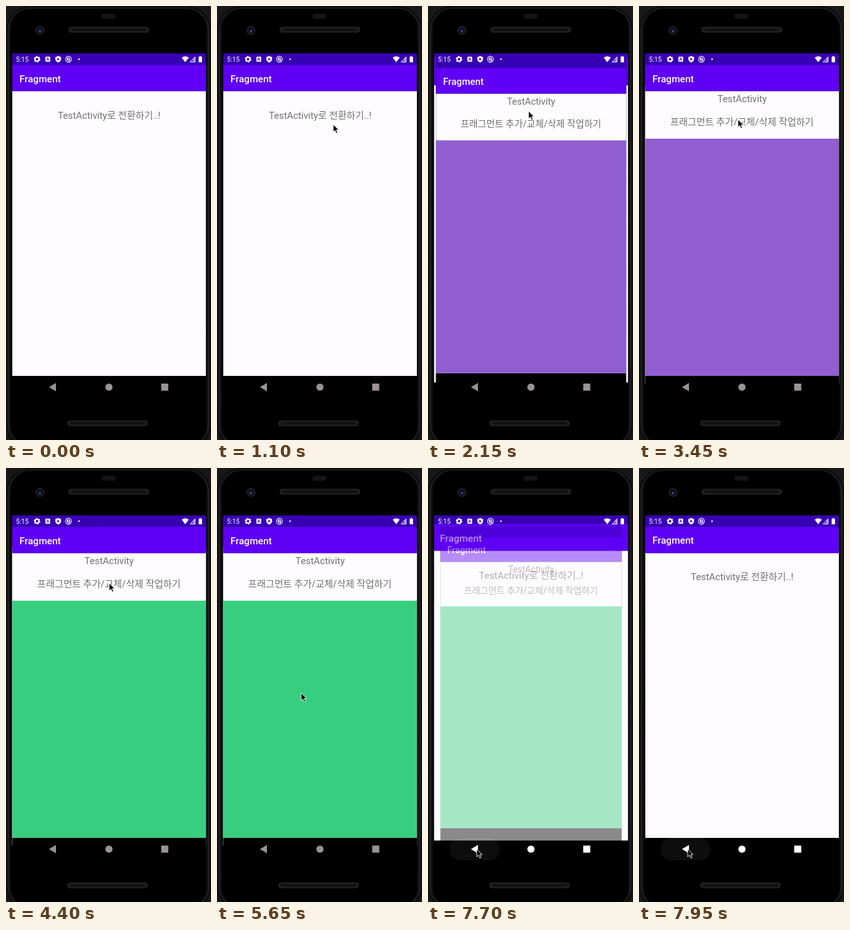
These frames come from a looping animation (320x677 px, 8 s). An HTML page:

```html
<!DOCTYPE html>
<html lang="ko">
<head>
<meta charset="utf-8">
<style>
html, body { margin: 0; width: 100%; height: 100%; overflow: hidden; background: #0a0a0a; }
svg { display: block; width: 100%; height: 100%; }
text { font-family: Roboto, "Noto Sans CJK KR", "Noto Sans CJK", sans-serif; }
.label { font-size: 14.8px; fill: #707070; text-anchor: middle; }
.title { font-size: 15.1px; font-weight: 500; fill: #fff; }
</style>
</head>
<body>
<svg viewBox="0 0 320 677">
  <defs>
    <clipPath id="screen"><rect x="9.5" y="74" width="302.7" height="539"/></clipPath>
    <linearGradient id="rim">
      <stop offset="0" stop-color="#1b1a1b"/><stop offset=".02" stop-color="#0b0b0b"/>
      <stop offset=".98" stop-color="#0b0b0b"/><stop offset="1" stop-color="#1b1a1b"/>
    </linearGradient>
    <g id="bars">
      <rect x="9.5" y="74" width="302.7" height="539"/>
      <rect x="9.5" y="74" width="302.7" height="19" fill="#3800b3"/>
      <rect x="9.5" y="92" width="302.7" height="41" fill="#5f00f4"/>
      <rect x="9.5" y="133" width="302.7" height="444" fill="#fefcfe"/>
      <text class="title" x="21" y="118.5">Fragment</text>
    </g>
    <g id="grille">
      <rect width="125" height="8" rx="4" fill="#1d1b1c" stroke="#302d2e" stroke-width=".8"/>
      <path d="M5 4H120" stroke="#090909" stroke-width="3" stroke-dasharray="1.2 .8"/>
    </g>
  </defs>

  <rect width="320" height="677" fill="#191819"/>
  <rect x="1" y="1" width="318" height="690" rx="36" fill="url(#rim)" stroke="#080808"/>
  <rect x="4" y="3" width="312" height="684" rx="34" fill="none" stroke="#29282a" stroke-width="1.2"/>
  <rect x="8" y="5" width="305" height="680" rx="31" fill="#000"/>
  <rect x="149" y="12" width="22" height="8" rx="4" fill="#151415"/>
  <circle cx="53" cy="38" r="6.5" fill="#171719" stroke="#252528"/>
  <circle cx="53" cy="38" r="3.4" fill="#0a0a28"/>
  <circle cx="53" cy="39" r="1.5" fill="#5560b8"/>
  <use href="#grille" x="98" y="33"/>
  <use href="#grille" x="96" y="647"/>

  <g clip-path="url(#screen)">
    <g id="main">
      <use href="#bars"/>
      <text class="label" x="161" y="175.5">TestActivity로 전환하기..!</text>
    </g>
    <g id="test">
      <use href="#bars"/>
      <rect id="fragment" x="9.5" y="207" width="302.7" height="370"/>
      <text class="label" x="161" y="150.3">TestActivity</text>
      <text class="label" x="160.7" y="186.2">프래그먼트 추가/교체/삭제 작업하기</text>
    </g>
  </g>

  <g fill="#fff">
    <text x="15.5" y="87" font-size="10.3">5:15</text>
    <circle cx="48.5" cy="83" r="3" fill="none" stroke="#fff" stroke-width="2.2"/>
    <circle cx="48.5" cy="83" r="4.4" fill="none" stroke="#fff" stroke-width="1.4" stroke-dasharray="2.3 2.3"/>
    <rect x="61.5" y="79" width="7.5" height="8" rx="1"/>
    <path d="M63.3 85.5 65.2 80.5 67.2 85.5M64 84H66.5" fill="none" stroke="#3800b3" stroke-width=".9"/>
    <path d="M81.5 78 86 79.8V83Q85.5 86.5 81.5 88.3 77.5 86.5 77 83V79.8Z"/>
    <path d="M80.2 80.8V85.2L83.8 83Z" fill="#3800b3"/>
    <g fill="none" stroke="#fff" stroke-width="1.1">
      <circle cx="97.5" cy="83" r="4.6"/><circle cx="97.5" cy="82.8" r="2.1"/><path d="M95 80.5 100.5 86.5"/>
    </g>
    <circle cx="114" cy="83" r="1.3"/>
    <path d="M274.3 80.5Q279.8 76.7 285.3 80.5L279.8 87.8Z"/>
    <path d="M287.5 87.3H295V79.5Z" fill="none" stroke="#fff"/>
    <path d="M291.5 87.5V83L295.3 79V87.5Z" opacity=".45"/>
    <path d="M302 78.3H304.5V79.3H306V87.7H300.7V79.3H302Z"/>
  </g>

  <rect id="ripple" x="34" y="577" width="77.5" height="35" rx="16" fill="#fff"/>
  <g id="nav">
    <path d="M67 594.5 78 588V601Z"/>
    <circle cx="160.7" cy="594.5" r="5.6"/>
    <rect x="242.3" y="589" width="11" height="11" rx=".6"/>
  </g>
  <path id="cursor" d="M0 0V12L2.8 9.4 4.8 14 6.9 13.1 4.9 8.6H8.6Z" fill="#000" stroke="#fff" stroke-width=".9"/>
</svg>
<script>
const LOOP = 8000, OPEN = 2015, SWAP = 3900, PRESS = 7530, CLOSE = 7620, SPAN = 400;
const $ = id => document.getElementById(id);
const clamp = v => Math.min(1, Math.max(0, v));
const bez = (a, b, c, d, u) =>
  a * (1 - u) ** 3 + 3 * b * u * (1 - u) ** 2 + 3 * c * u * u * (1 - u) + d * u ** 3;

// fast out, extra slow in: two joined cubic curves
function ease(x) {
  x = clamp(x);
  const [xs, ys] = x < 1 / 6
    ? [[0, .05, .133333, 1 / 6], [0, 0, .06, .4]]
    : [[1 / 6, .208333, .25, 1], [.4, .82, 1, 1]];
  let lo = 0, hi = 1;
  for (let i = 0; i < 24; i++) {
    const mid = (lo + hi) / 2;
    if (bez(...xs, mid) < x) lo = mid; else hi = mid;
  }
  return bez(...ys, lo);
}

// time, x, y
const track = [
  [350, 321, 274], [900, 190, 192], [1500, 157, 164], [2700, 157, 164],
  [3250, 154.5, 177], [3500, 154.5, 177], [4150, 161, 179.5], [5250, 161, 179.5],
  [6000, 107, 490], [6450, 84, 612], [6700, 85, 607], [6900, 81, 600],
  [7250, 76, 594.5], [8000, 76, 594.5]
];

function pointer(t) {
  if (t < track[0][0]) return [400, 274];
  const i = track.findIndex(p => p[0] > t);
  const [t0, x0, y0] = track[i - 1], [t1, x1, y1] = track[i];
  const k = (t - t0) / (t1 - t0), s = k * k * (3 - 2 * k);
  return [x0 + (x1 - x0) * s, y0 + (y1 - y0) * s];
}

function pose(el, scale, alpha) {
  el.setAttribute("transform", `translate(160.85 343.5) scale(${scale}) translate(-160.85 -343.5)`);
  el.setAttribute("opacity", alpha);
}

function draw(t) {
  const closing = t >= CLOSE;
  const p = ease((t - (closing ? CLOSE : OPEN)) / SPAN);
  if (closing) {
    pose($("main"), 1.05 - .05 * p, 1);
    pose($("test"), 1 - .1 * p, 1 - clamp((t - CLOSE - 35) / 83));
  } else {
    pose($("main"), 1 + .05 * p, 1);
    pose($("test"), .85 + .15 * p, clamp((t - OPEN - 50) / 83));
  }
  $("fragment").setAttribute("fill", t < SWAP ? "#915ed1" : "#38ce80");
  $("nav").setAttribute("fill", t < PRESS ? "#999395" : "#fff");
  $("ripple").setAttribute("opacity", .05 * clamp((t - PRESS) / 120));
  $("cursor").setAttribute("transform", `translate(${pointer(t)})`);
}

const start = performance.now();
function tick() {
  draw((performance.now() - start) % LOOP);
  requestAnimationFrame(tick);
}
tick();
</script>
</body>
</html>
```
